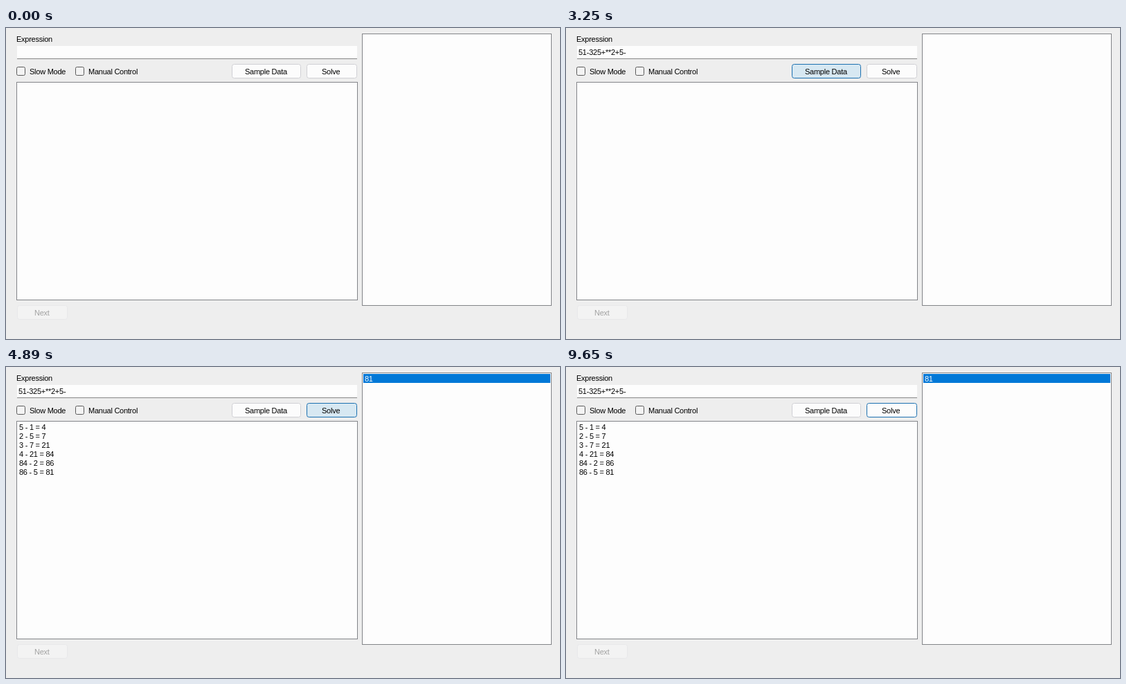
Recreate the animation shown at these times as an HTML page. Size 800 px wide and 450 px high, loop 9.67 s.

```html
<!DOCTYPE html>
<html lang="en">
<head>
<meta charset="utf-8">
<title>Postfix solver</title>
<style>
  html, body { margin: 0; width: 100%; height: 100%; overflow: hidden; background: #eee; }
  svg { display: block; width: 800px; height: 450px; }
  text { font: 11px "Liberation Sans", Arial, sans-serif; letter-spacing: -.25px; fill: #000; white-space: pre; }
  .panel { fill: #fdfdfd; stroke: #828488; }
  .check { fill: #f3f3f3; stroke: #5a5a5a; }
  .selected { fill: #0078d7; }
</style>
</head>
<body>
<svg id="stage" viewBox="0 0 800 450"></svg>
<script>
const LOOP = 9670;
const EXPRESSION = "51-325+**2+5-";
const stage = document.getElementById("stage");

function add(tag, attrs, content = "") {
  const node = document.createElementNS("http://www.w3.org/2000/svg", tag);
  for (const key in attrs) node.setAttribute(key, attrs[key]);
  node.textContent = content;
  stage.append(node);
  return node;
}
const box = (x, y, width, height, attrs) => add("rect", { x, y, width, height, ...attrs });
const label = (x, y, content) => add("text", { x, y }, content);

function button(x, y, width, textX, caption) {
  return {
    face: box(x + .5, y + .5, width - 1, 20, { rx: 3 }),
    caption: label(textX, y + 15, caption),
  };
}

function checkbox(x, caption) {
  box(x + .5, 56.5, 12, 12, { rx: 2, class: "check" });
  label(x + 19, 67, caption);
}

label(15, 20, "Expression");
box(16, 26, 491, 18, { fill: "#fdfdfd" });
box(16, 44, 491, 1, { fill: "#868686" });
const input = label(18, 39, "");
checkbox(15, "Slow Mode");
checkbox(100, "Manual Control");
const sample = button(326, 52, 100, 345, "Sample Data");
const solve = button(434, 52, 73, 456, "Solve");
box(15.5, 78.5, 492, 315, { class: "panel" });
box(514.5, 8.5, 273, 393, { class: "panel" });
const next = button(16, 401, 73, 41, "Next");
const marker = box(516, 10, 270, 13, { class: "selected" });
const logRows = Array.from({ length: 6 }, (_, i) => label(19, 91 + 13 * i, ""));
const tokenRows = Array.from({ length: 13 }, (_, i) => label(518, 21 + 13 * i, ""));

// Each state holds the remaining tokens, the highlighted row and the log so far.
function evaluate(expression) {
  const apply = { "+": (a, b) => a + b, "-": (a, b) => a - b, "*": (a, b) => a * b };
  let tokens = [...expression], log = [], row = 0;
  const states = [];
  while (row < tokens.length) {
    const operator = apply[tokens[row]];
    if (operator) {
      const [a, b] = tokens.slice(row - 2, row);
      const result = operator(+a, +b);
      tokens = tokens.toSpliced(row - 2, 3, String(result));
      log = [...log, `${a} - ${b} = ${result}`];
      row -= 2;
    }
    states.push({ tokens, log, row });
    row++;
  }
  return states;
}

const states = evaluate(EXPRESSION);
const stateTimes = states.map((_, i) => i < 6 ? 4260 + 50 * i : 4610 + 40 * (i - 6));
const between = (t, start, end) => t >= start && t < end;
const clamp = v => Math.max(0, Math.min(1, v));
const mix = (a, b, k) => `rgb(${a.map((v, i) => Math.round(v + (b[i] - v) * k))})`;
const glow = (t, enter, leave) => clamp((t - enter) / 150) - clamp((t - leave) / 200);

function paintButton({ face, caption }, { hover = 0, focus = false, pressed = false, enabled = true }) {
  const fill = enabled ? [252, 252, 252] : [243, 243, 243];
  const border = enabled ? [208, 208, 212] : [232, 232, 234];
  face.style.fill = pressed ? "#c4dff0" : mix(fill, [215, 232, 242], hover);
  face.style.stroke = mix(border, [28, 112, 176], focus ? 1 : hover);
  caption.style.fill = enabled ? "#000" : "#a2a2a2";
}

function render(t) {
  input.textContent = t >= 2960 ? EXPRESSION : "";
  paintButton(sample, {
    hover: glow(t, 2600, 3500), focus: between(t, 2860, 4180), pressed: between(t, 2860, 2960),
  });
  paintButton(solve, {
    hover: glow(t, 3750, 5100), focus: t >= 4180, pressed: between(t, 4180, 4260),
  });
  paintButton(next, { enabled: between(t, 4260, stateTimes.at(-1)) });

  const state = states[stateTimes.filter(time => time <= t).length - 1];
  const { tokens, log, row } = state || { tokens: [], log: [], row: -1 };
  logRows.forEach((node, i) => node.textContent = log[i] || "");
  tokenRows.forEach((node, i) => {
    node.textContent = tokens[i] || "";
    node.style.fill = i === row ? "#fff" : "#000";
  });
  marker.style.visibility = state ? "visible" : "hidden";
  marker.setAttribute("y", 10 + 13 * Math.max(0, row));
}

const start = performance.now();
function tick() {
  render((performance.now() - start) % LOOP);
  requestAnimationFrame(tick);
}
tick();
</script>
</body>
</html>
```
